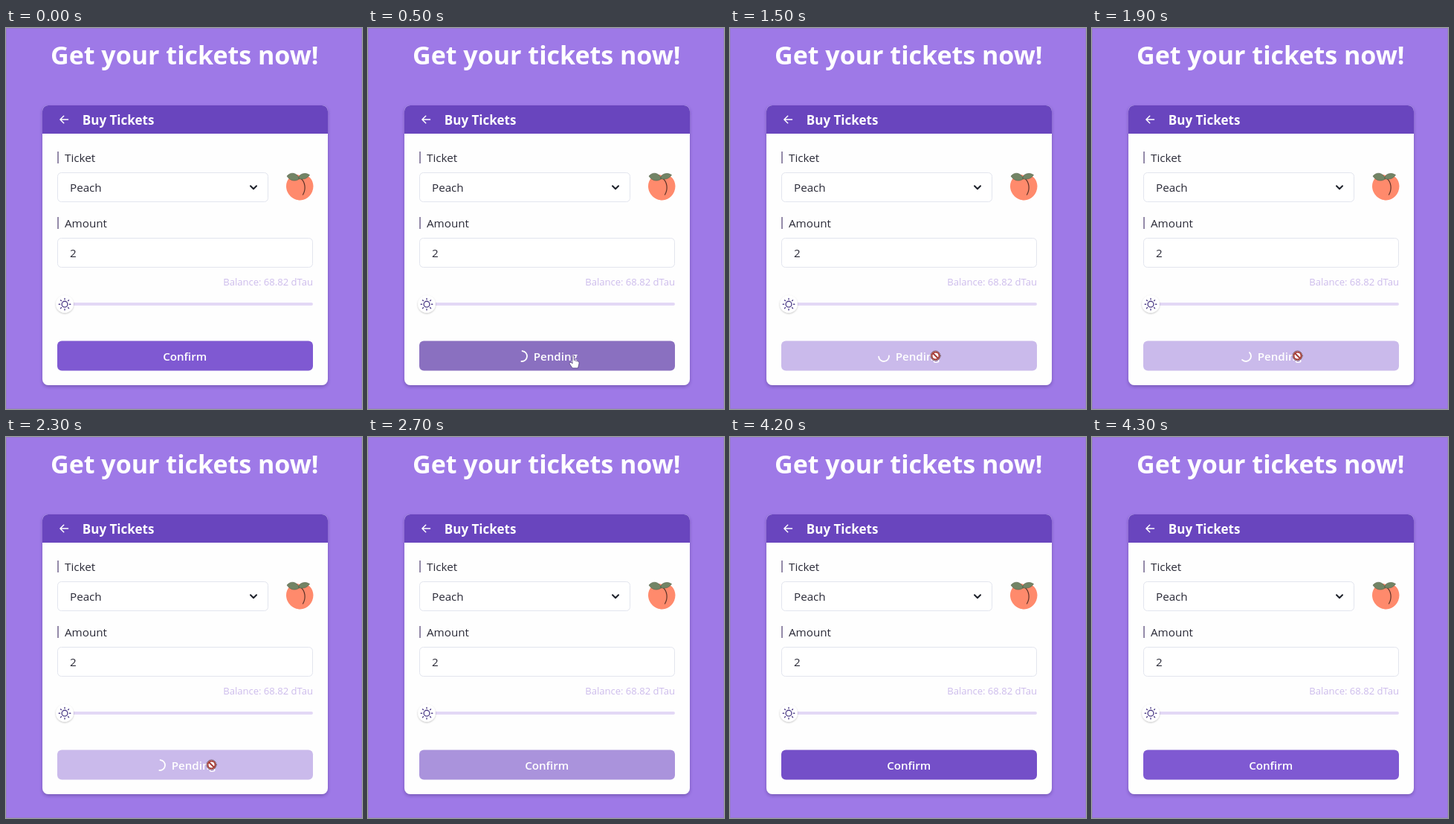
Recreate the animation shown at these times as an HTML page. Size 479x512 px, loop 4700 ms.

```html
<!DOCTYPE html>
<html lang="en">
<head>
<meta charset="utf-8">
<title>Get your tickets now!</title>
<style>
  html, body { margin: 0; width: 100%; height: 100%; overflow: hidden; background: #9e79e7; }
  svg { display: block; width: 100vw; height: 100vh; }
  text { font-family: "Open Sans", "Noto Sans", sans-serif; font-size: 15.2px; fill: #2a2a37; }
  .title { font-size: 34px; font-weight: 700; fill: #fff; text-anchor: middle; }
  .head { font-size: 17px; font-weight: 700; fill: #fff; }
  .balance { font-size: 13.05px; fill: #cdbcec; text-anchor: end; }
  .btn { font-size: 15.1px; font-weight: 600; fill: #fff; }
  .field { fill: #fff; stroke: #e2e5ee; }
  .line { fill: none; stroke-linecap: round; stroke-linejoin: round; }
</style>
</head>
<body>
<svg viewBox="0 0 479 512">
  <defs>
    <filter id="cardShadow" x="-10%" y="-10%" width="120%" height="120%">
      <feDropShadow dx="0" dy="2" stdDeviation="2" flood-color="#3b2470" flood-opacity=".4"/>
    </filter>
    <filter id="thumbShadow" x="-30%" y="-30%" width="160%" height="160%">
      <feDropShadow dx="0" dy="1" stdDeviation="1" flood-color="#000" flood-opacity=".25"/>
    </filter>
  </defs>
  <rect x=".5" y=".5" width="478" height="511" fill="#9e79e7" stroke="#977acf"/>
  <text class="title" x="240.3" y="48.8">Get your tickets now!</text>

  <rect x="49" y="104" width="384" height="376" rx="8" fill="#fefefe" filter="url(#cardShadow)"/>
  <path d="M49 142V112a8 8 0 0 1 8-8H425a8 8 0 0 1 8 8V142Z" fill="#6945be"/>
  <path class="line" d="M83.5 123H73M77.7 118.2L72.9 123L77.7 127.8" stroke="#fff" stroke-width="1.5"/>
  <text class="head" x="102.8" y="129.5">Buy Tickets</text>

  <path d="M70 166V182M70 254V270" stroke="#948aa9" stroke-width="2"/>
  <text x="79" y="180">Ticket</text>
  <text x="79" y="268">Amount</text>
  <rect class="field" x="69.5" y="194.5" width="283" height="39" rx="5"/>
  <rect class="field" x="69.5" y="282.5" width="343" height="39" rx="5"/>
  <text x="86" y="219.5">Peach</text>
  <text x="86" y="308">2</text>
  <path class="line" d="M329 212.2L333 216.2L337 212.2" stroke="#1c2029" stroke-width="2"/>

  <g id="peach">
    <path d="M395 198C404 194 413.5 202 413.5 212.5C413.5 223 405 231.500 396 231.500C386 231.500 377 223 377 212.500C377 202 387 194 395 198Z" fill="#ff8a6c"/>
    <path class="line" d="M397 202.500C402.500 207 404 216.500 399.500 224" stroke="#5c3329" stroke-width="1.200"/>
    <path d="M378 199C383 193 391 194 395 202.500C389 207 382 205.500 378 199ZM393.500 202.500C393.500 196.500 402 193 408.500 197.500C405 203 399 204 393.500 202.500Z" fill="#728465" stroke="#566049" stroke-width=".6"/>
  </g>

  <text class="balance" x="413" y="345.500">Balance: 68.82 dTau</text>
  <rect x="79" y="369" width="334" height="4" rx="2" fill="#e3d8f6"/>
  <circle cx="79" cy="371" r="11.8" fill="#fff" filter="url(#thumbShadow)"/>
  <g class="line" transform="translate(79 371.200)" stroke="#51418a" stroke-width="1.400">
    <circle r="3.900"/>
    <path id="rays"/>
  </g>

  <rect id="button" x="69" y="420.500" width="344" height="40" rx="6"/>
  <text id="confirm" class="btn" x="240.700" y="446.500" text-anchor="middle">Confirm</text>
  <g id="pending">
    <path id="spinner" class="line" d="M0 -7A7 7 0 0 1 0 7" stroke="#fff" stroke-width="1.800"/>
    <text class="btn" x="222.800" y="446.500">Pending</text>
  </g>

  <path id="arrow" d="M0 0V15L3.500 12L6 17.500L8.500 16.500L6 11H11Z" fill="#fff" stroke="#222" stroke-width=".8"/>
  <path id="hand" d="M0 1Q1.300 -.8 2.300 1V6.500L8 8Q9.500 8.500 9 11L7.500 17H0L-4 11Q-4 8.500 -1.500 9.500L0 11Z" fill="#fff" stroke="#55427f" stroke-width=".8"/>
  <g id="blocked" class="line" transform="translate(276.500 440.500)">
    <circle r="6.600" fill="#fff" stroke="#5d3a48" stroke-width=".8"/>
    <path d="M-5 0A5 5 0 1 1 5 0A5 5 0 1 1 -5 0M-3.500 -3.500L3.500 3.500" stroke="#a53a35" stroke-width="1.900"/>
  </g>
</svg>
<script>
  const LOOP = 4700, STEP = 100, SPIN = 450;
  const $ = id => document.getElementById(id);
  const BASE = [127, 89, 210], HOVER = [105, 69, 190], FADE = [138, 112, 192], OFF = [202, 186, 235];

  const mix = (a, b, k) => `rgb(${a.map((v, i) => Math.round(v + (b[i] - v) * k))})`;
  const ramp = (t, from, to) => Math.min(1, Math.max(0, (t - from) / (to - from)));
  const show = (id, on) => $(id).setAttribute('visibility', on ? 'visible' : 'hidden');
  const move = (id, x, y, turn = 0) =>
    $(id).setAttribute('transform', `translate(${x} ${y}) rotate(${turn})`);

  $('rays').setAttribute('d', Array.from({ length: 8 }, (_, i) => {
    const c = Math.cos(i * Math.PI / 4), s = Math.sin(i * Math.PI / 4);
    return `M${6.5 * c} ${6.5 * s}L${7.8 * c} ${7.8 * s}`;
  }).join(''));

  function buttonColor(t) {
    if (t < 400) return mix(BASE, HOVER, ramp(t, 100, 300));
    if (t <= 500) return mix(HOVER, FADE, ramp(t, 400, 500));
    if (t < 2700) return mix(FADE, OFF, ramp(t, 500, 700));
    if (t < 4200) return mix(OFF, HOVER, ramp(t, 2600, 2900));
    return mix(HOVER, BASE, ramp(t, 4100, 4300));
  }

  function draw(time) {
    const t = Math.floor((time % LOOP) / STEP) * STEP;
    const busy = t >= 500 && t < 2700;
    $('button').setAttribute('fill', buttonColor(t));
    show('confirm', !busy);
    show('pending', busy);
    move('spinner', 207, 441, 5 + (t - 500) / SPIN * 360);

    const enter = ramp(t, 100, 300);
    show('arrow', t === 100);
    move('arrow', 279, 475);
    show('hand', t >= 200 && t < 700);
    move('hand', 275 + 4 * (1 - enter), 440 + 34 * (1 - enter) ** 2);
    show('blocked', t >= 700 && t < 2700);
  }

  const start = performance.now();
  function tick() {
    draw(performance.now() - start);
    requestAnimationFrame(tick);
  }
  draw(0);
  requestAnimationFrame(tick);
</script>
</body>
</html>
```
